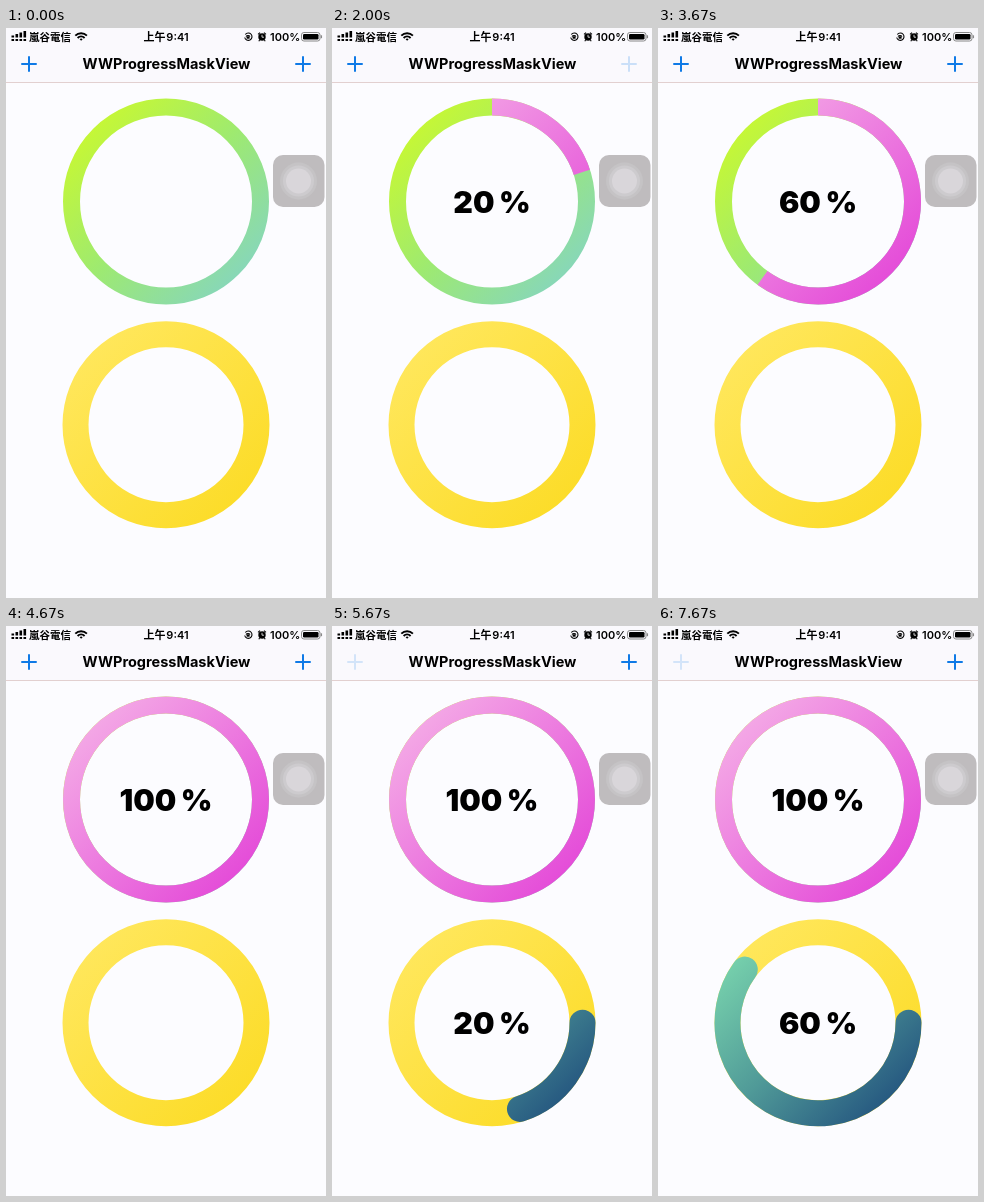
These frames come from a looping animation (320 by 570 pixels, 8 s). An HTML page:

```html
<!DOCTYPE html>
<html lang="zh-Hant">
<head>
<meta charset="utf-8">
<title>WWProgressMaskView</title>
<style>
  html, body { margin: 0; width: 100%; height: 100%; overflow: hidden; background: #fcfcff; }
  svg { display: block; width: 100vw; height: 100vh; }
  text { font-family: Inter, "Noto Sans CJK TC", "Noto Sans CJK", sans-serif; fill: #000; }
  .status { font-size: 11px; font-weight: 600; }
  .title { font-size: 14.5px; font-weight: 700; text-anchor: middle; }
  .percent { font-size: 30.3px; font-weight: 900; text-anchor: middle; word-spacing: -1.5px; }
  .plus { stroke: #0f7ae6; stroke-width: 2; stroke-linecap: round; }
  .ring { fill: none; }
</style>
</head>
<body>
<svg viewBox="0 0 320 570">
  <defs>
    <linearGradient id="lime" gradientUnits="userSpaceOnUse" x1="57" y1="70" x2="263" y2="276">
      <stop offset=".12" stop-color="#c8f832"/>
      <stop offset=".5" stop-color="#9eea70"/>
      <stop offset=".88" stop-color="#86d6bc"/>
    </linearGradient>
    <linearGradient id="pink" gradientUnits="userSpaceOnUse" x1="57" y1="70" x2="263" y2="276">
      <stop offset=".12" stop-color="#f4aae6"/>
      <stop offset=".88" stop-color="#e44ad8"/>
    </linearGradient>
    <linearGradient id="gold" gradientUnits="userSpaceOnUse" x1="57" y1="294" x2="263" y2="500">
      <stop offset=".12" stop-color="#ffe75c"/>
      <stop offset=".88" stop-color="#fcdc28"/>
    </linearGradient>
    <linearGradient id="ocean" gradientUnits="userSpaceOnUse" x1="57" y1="294" x2="263" y2="500">
      <stop offset=".14" stop-color="#76d0ac"/>
      <stop offset=".5" stop-color="#509a98"/>
      <stop offset=".9" stop-color="#22527e"/>
    </linearGradient>
  </defs>

  <rect width="320" height="570" fill="#fcfcff"/>
  <rect width="320" height="54" fill="#faf9fd"/>
  <path d="M0 54.5H320" stroke="#e2d0d0"/>

  <path d="M6.8 9.5V7.5M10.8 9.5V6M14.8 9.5V4.5M18.8 9.5V3" stroke="#000" stroke-width="2.6"/>
  <path d="M5.5 12H20.1" stroke="#000" stroke-width="2.2" stroke-dasharray="2.6 1.4"/>
  <text class="status" x="23" y="13" style="font-size:10.5px">嵐谷電信</text>
  <g fill="none" stroke="#000" stroke-width="1.9">
    <path d="M69.3 7.6a8.2 8.2 0 0 1 11.6 0M71.6 10a5 5 0 0 1 7 0"/>
    <path d="M73.6 11.2a2.1 2.1 0 0 1 3 0L75.1 12.8Z" fill="#000" stroke="none"/>
  </g>
  <text class="status" x="160" y="13" text-anchor="middle">上午&#8202;9:41</text>
  <g fill="none" stroke="#000" stroke-width="1.1">
    <path d="M239.3 6.5a3.7 3.7 0 1 1-.6 3M240 8.6a2.3 2.3 0 0 1 4 0"/>
    <rect x="240.6" y="8.3" width="3" height="2.4" fill="#000" stroke="none"/>
    <circle cx="256" cy="9" r="3.7" fill="#000" stroke="none"/>
    <path d="M252 6.4l2-1.8M260 6.4l-2-1.8M253.6 12l-.8 1.2M258.4 12l.8 1.2"/>
    <path d="M256 6.8V9.2H258" stroke="#fff" stroke-width=".8"/>
  </g>
  <text class="status" x="264" y="13">100%</text>
  <rect x="295.5" y="4.5" width="18.5" height="8.5" rx="2.4" fill="none" stroke="#888"/>
  <rect x="297" y="6" width="15.5" height="5.5" rx="1.2"/>
  <path d="M315.4 7.3V10.2" stroke="#888" stroke-width="1.3"/>

  <text class="title" x="160.5" y="41">WWProgressMaskView</text>
  <path class="plus" id="leftPlus" d="M16 36H30M23 29V43"/>
  <path class="plus" id="rightPlus" d="M290 36H304M297 29V43"/>

  <circle class="ring" cx="160" cy="173.5" r="94.5" stroke="url(#lime)" stroke-width="17"/>
  <path class="ring" id="topArc" stroke="url(#pink)" stroke-width="17"/>
  <text class="percent" id="topText" x="160" y="184.7"></text>

  <circle class="ring" cx="160" cy="396.8" r="90.5" stroke="url(#gold)" stroke-width="26"/>
  <path class="ring" id="bottomArc" stroke="url(#ocean)" stroke-width="26" stroke-linecap="round"/>
  <text class="percent" id="bottomText" x="160" y="408"></text>

  <rect x="267" y="127" width="51.5" height="52" rx="10" fill="#bfbcbe"/>
  <circle cx="292.5" cy="153" r="18.5" fill="#c5c3c5"/>
  <circle cx="292.5" cy="153" r="15.5" fill="#cdcbce"/>
  <circle cx="292.5" cy="153" r="12.5" fill="#d9d6da"/>
</svg>
<script>
const DURATION = 8000;
const byId = id => document.getElementById(id);

// Each track is a list of [start ms, value]; values hold until the next start.
const topSteps = [[0, 0], [1670, 20], [2330, 40], [2670, 60], [4000, 80], [4330, 100]];
const bottomSteps = [[0, 0], [5330, 20], [6000, 40], [7000, 60]];
const rightAlpha = [[0, 1], [2000, .2], [2330, 1], [2670, .4], [3000, 1], [4000, .2], [4330, 1]];
const leftAlpha = [[0, 1], [5000, .2], [5330, 1], [5670, .16], [6000, 1],
                   [6670, .32], [7000, 1], [7670, .16]];

const valueAt = (track, time) => track.filter(([start]) => start <= time).pop()[1];

function arcPath(cx, cy, r, startDeg, percent) {
  if (!percent) return "";
  const point = deg => {
    const a = deg * Math.PI / 180;
    return `${cx + r * Math.cos(a)} ${cy + r * Math.sin(a)}`;
  };
  const sweep = percent * 3.6;
  const arc = deg => `A${r} ${r} 0 0 1 ${point(startDeg + deg)}`;
  return `M${point(startDeg)}${arc(sweep / 2)}${arc(sweep)}`;
}

function showProgress(name, percent, cx, cy, r, startDeg) {
  byId(name + "Arc").setAttribute("d", arcPath(cx, cy, r, startDeg, percent));
  byId(name + "Text").textContent = percent ? `${percent} %` : "";
}

function render(time) {
  showProgress("top", valueAt(topSteps, time), 160, 173.5, 94.5, -90);
  showProgress("bottom", valueAt(bottomSteps, time), 160, 396.8, 90.5, 0);
  byId("leftPlus").setAttribute("opacity", valueAt(leftAlpha, time));
  byId("rightPlus").setAttribute("opacity", valueAt(rightAlpha, time));
}

const origin = performance.now();
function tick() {
  render((performance.now() - origin) % DURATION);
  requestAnimationFrame(tick);
}
tick();
</script>
</body>
</html>
```
